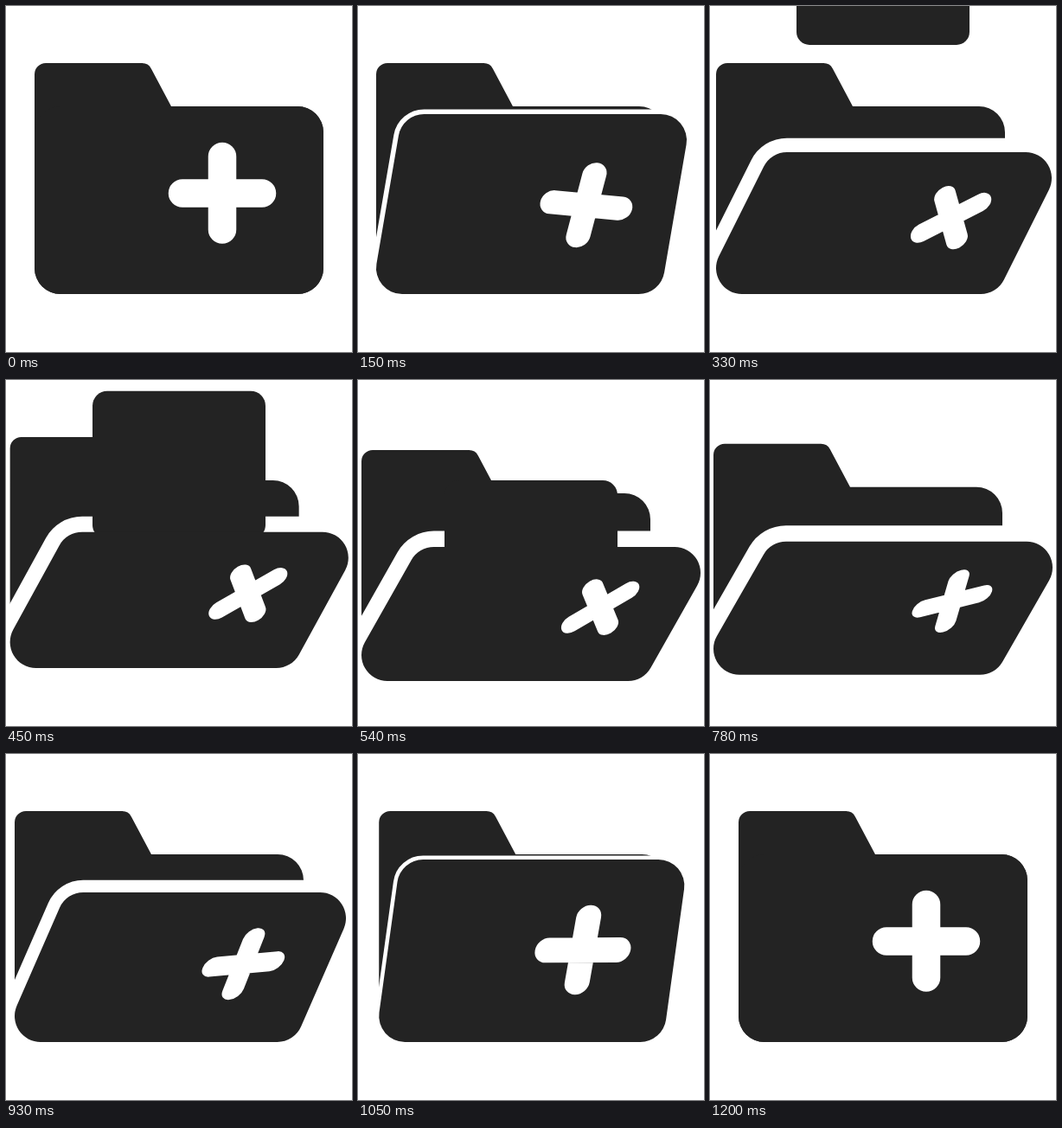
Write an HTML page with a canvas that moves like this. It is 400 by 400 pixels and loops after 3230 ms.

```html
<!DOCTYPE html>
<html lang="en">
<head>
<meta charset="utf-8">
<title>Add to folder</title>
<style>
  html, body { margin: 0; width: 100%; height: 100%; overflow: hidden; background: #fff; }
  canvas { display: block; width: 100vw; height: 100vh; }
</style>
</head>
<body>
<canvas id="stage" width="400" height="400"></canvas>
<script>
const ctx = document.getElementById('stage').getContext('2d');
const INK = '#232323', PAPER = '#fff';
const LOOP = 3230, STEP = 30, END = 1200;
const L = 33, R = 367, TOP = 116, BOTTOM = 333, RAD = 30;

// time, flap tilt (deg), back shift, flap overhang, plus centre x y, plus axes (ax ay bx by)
const FLAP = [
  [0,    0,    0,  0,  250,   216,   1,    0,    0,    1],
  [150,  16.6, 12, 13, 264,   230,   .85,  .08,  -.22, .836],
  [330,  40.9, 26, 28, 278.5, 244.5, .745, -.38, .165, .594],
  [540,  44.4, 29, 29, 280,   247.5, .718, -.42, .21,  .51],
  [660,  44.8, 29, 29, 280,   248,   .74,  -.28, -.08, .6],
  [810,  44.8, 29, 29, 280,   247.5, .74,  -.16, -.2,  .62],
  [930,  37.1, 23, 26, 274.5, 242.5, .755, -.07, -.28, .708],
  [1080, 9,    6,  7,  257,   223,   .92,  0,    -.12, .92],
  [1200, 0,    0,  0,  250,   216,   1,    0,    0,    1]
];
// time, vertical push of the whole folder
const PUSH = [[0, 0], [500, 0], [540, 15], [610, 42], [660, 37], [840, 0], [1200, 0]];

// Monotone cubic through the rows; flat at both ends.
function sample(rows, t) {
  let i = 0;
  while (i < rows.length - 2 && t >= rows[i + 1][0]) i++;
  const a = rows[i], b = rows[i + 1], span = b[0] - a[0], x = (t - a[0]) / span;
  const rate = (j, c) => (rows[j + 1][c] - rows[j][c]) / (rows[j + 1][0] - rows[j][0]);
  const slope = (j, c) => {
    if (j === 0 || j === rows.length - 1) return 0;
    const p = rate(j - 1, c), q = rate(j, c);
    return p * q > 0 ? 2 * p * q / (p + q) : 0;
  };
  return a.slice(1).map((v, n) => {
    const c = n + 1;
    return v + (b[c] - v) * x * x * (3 - 2 * x)
      + span * x * (1 - x) * (slope(i, c) * (1 - x) - slope(i + 1, c) * x);
  });
}

// Closed polygon with rounded corners: [x, y, radius]
function rounded(points) {
  const n = points.length, [x0, y0] = points[0], [x1, y1] = points[n - 1];
  ctx.beginPath();
  ctx.moveTo((x0 + x1) / 2, (y0 + y1) / 2);
  points.forEach(([x, y, r], i) => {
    const [nx, ny] = points[(i + 1) % n];
    ctx.arcTo(x, y, nx, ny, r);
  });
  ctx.closePath();
}

function drawBack(shift) {
  const l = L - shift, r = R - shift;
  rounded([
    [l, 66, 13], [164.5 - shift, 66, 12], [191 - shift, TOP, 0],
    [r, TOP, RAD], [r, BOTTOM, RAD], [l, BOTTOM, RAD]
  ]);
  ctx.fill();
}

function flapPath(top, lean, shift, over) {
  const reach = RAD * Math.hypot(1, lean);
  const right = y => R + over - RAD + reach - lean * (y - top - RAD);
  const left = y => L - shift + RAD - reach - lean * (y - BOTTOM + RAD);
  rounded([
    [left(top), top, RAD], [right(top), top, RAD],
    [right(BOTTOM), BOTTOM, RAD], [left(BOTTOM), BOTTOM, RAD]
  ]);
}

function drawSheet(t, limit) {
  const bottom = 45 + (t - 330) * 1.148, top = bottom - 170;
  if (bottom <= 0 || top >= limit) return;
  ctx.save();
  ctx.beginPath();
  ctx.rect(0, 0, 400, limit);
  ctx.clip();
  rounded([[100, top, 17], [300, top, 17], [300, bottom, 15], [100, bottom, 15]]);
  ctx.fill();
  ctx.restore();
}

function drawPlus(x, y, ax, ay, bx, by) {
  ctx.save();
  ctx.transform(ax, ay, bx, by, x, y);
  ctx.beginPath();
  ctx.moveTo(-46, 0.5);
  ctx.lineTo(46, 0.5);
  ctx.moveTo(0, -42);
  ctx.lineTo(0, 42.5);
  ctx.lineWidth = 32.5;
  ctx.lineCap = 'round';
  ctx.stroke();
  ctx.restore();
}

function draw(t) {
  const [tilt, shift, over, ...plus] = sample(FLAP, t);
  const [push] = sample(PUSH, t);
  const angle = tilt * Math.PI / 180, tan = Math.tan(angle);
  const top = BOTTOM - (BOTTOM - TOP) * Math.cos(angle);
  const lean = tan / Math.sqrt(3), gap = 18.8 * tan;

  ctx.fillStyle = PAPER;
  ctx.fillRect(0, 0, 400, 400);
  ctx.fillStyle = INK;
  ctx.strokeStyle = PAPER;

  ctx.save();
  ctx.translate(0, push);
  drawBack(shift);
  flapPath(top, lean, shift, over);
  if (gap > 0.01) {
    ctx.lineWidth = 2 * gap;
    ctx.lineJoin = 'round';
    ctx.stroke();
  }
  ctx.restore();

  drawSheet(t, top + push + 1);

  ctx.save();
  ctx.translate(0, push);
  flapPath(top, lean, shift, over);
  ctx.fill();
  drawPlus(...plus);
  ctx.restore();
}

const start = performance.now();
function tick() {
  const t = (performance.now() - start) % LOOP;
  draw(Math.min(END, Math.floor(t / STEP) * STEP));
  requestAnimationFrame(tick);
}
tick();
</script>
</body>
</html>
```
